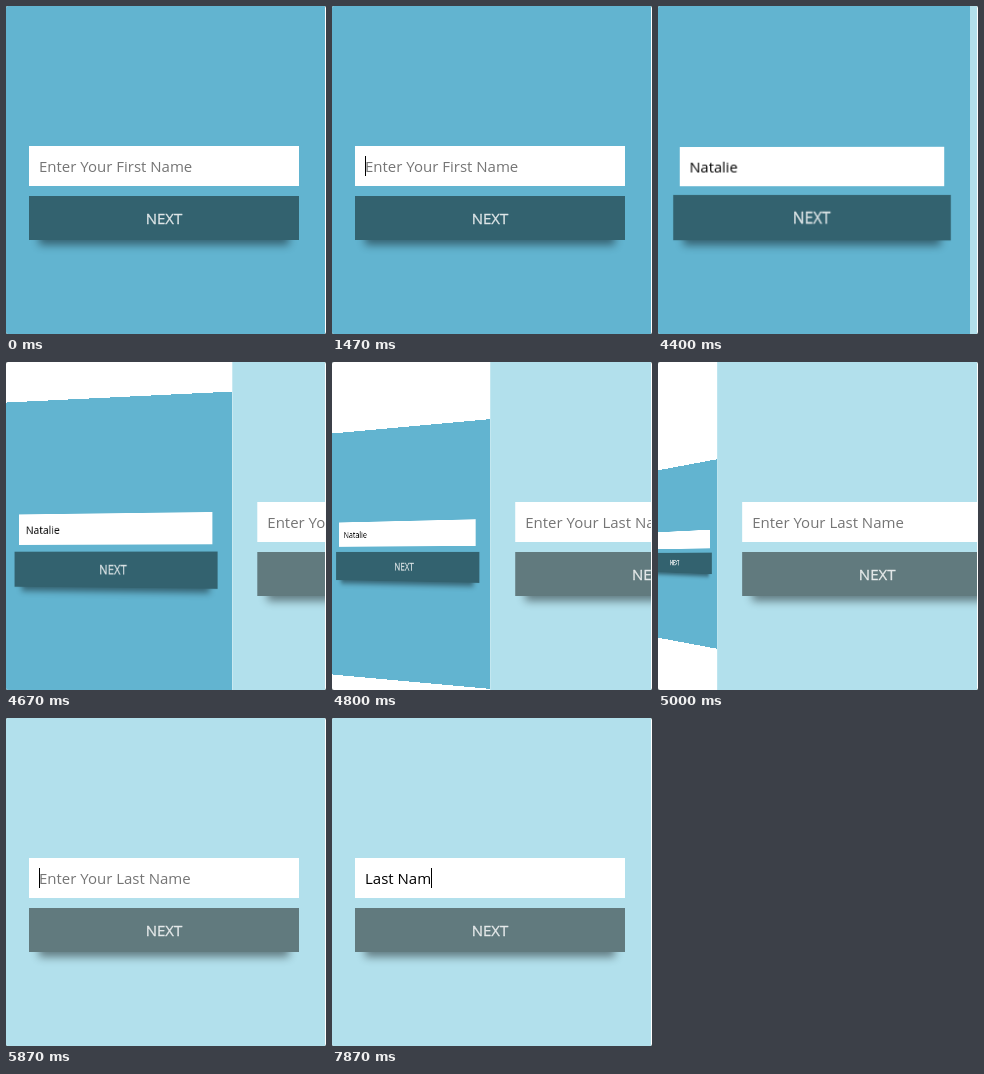
An HTML page that plays this animation: 320 by 328 pixels, repeating every 8000 ms.

```html
<!DOCTYPE html>
<html lang="en">
<head>
<meta charset="utf-8">
<title>Name form</title>
<style>
html, body { margin: 0; width: 100%; height: 100%; overflow: hidden; background: #566; }
#stage { position: absolute; width: 320px; height: 328px; overflow: hidden; background: #fff; border-radius: 2px; }
#view { position: absolute; width: 319px; height: 328px; overflow: hidden; }
.page {
  position: absolute; left: -2px; top: -8px; width: 321px; height: 400px;
  font: 15px/40px "Open Sans", sans-serif; transform-origin: 100% 50%;
}
.field {
  position: absolute; left: 25px; top: 148px; width: 260px; height: 40px; padding-left: 10px;
  display: flex; align-items: center; white-space: pre; background: #fff; color: #000;
}
.caret { width: 1px; height: 20px; margin-right: -1px; background: #000; }
.hint { color: #757575; }
.next {
  position: absolute; left: 25px; top: 198px; width: 270px; height: 44px; line-height: 45px;
  text-align: center; color: rgba(255, 255, 255, .8); -webkit-text-stroke: .3px;
  box-shadow: 0 15px 8px -10px rgba(0, 0, 0, .45);
}
#first { background: #62b4d0; }
#first .next { background: #33626f; }
#last { background: #b2e0ec; }
#last .next { background: #617a7e; }
</style>
</head>
<body>
<div id="stage"><div id="view">
  <div class="page" id="first">
    <div class="field"><span class="typed"></span><i class="caret"></i><span class="hint">Enter Your First Name</span></div>
    <div class="next">NEXT</div>
  </div>
  <div class="page" id="last">
    <div class="field"><span class="typed"></span><i class="caret"></i><span class="hint">Enter Your Last Name</span></div>
    <div class="next">NEXT</div>
  </div>
</div></div>
<script>
const LOOP = 8000, WIDTH = 321;
const clamp = x => Math.min(1, Math.max(0, x));

// cubic-bezier(.42, 0, .58, 1), solved by bisection
function easeInOut(x) {
  let lo = 0, hi = 1;
  for (let i = 0; i < 20; i++) {
    const s = (lo + hi) / 2, r = 1 - s;
    if (1.26 * s * r * r + 1.74 * s * s * r + s * s * s < x) lo = s; else hi = s;
  }
  return lo * lo * (3 - 2 * lo);
}

// keys: [time, letters typed]; carets: [on, off]
function makeForm(id, text, keys, carets) {
  const page = document.getElementById(id);
  const [typed, caret, hint, next] = ['.typed', '.caret', '.hint', '.next'].map(s => page.querySelector(s));
  return {
    page, next,
    update(t) {
      const key = keys.filter(k => k[0] <= t).pop();
      typed.textContent = key ? text.slice(0, key[1]) : '';
      hint.hidden = !!key;
      caret.style.visibility = carets.some(([on, off]) => t >= on && t < off) ? 'visible' : 'hidden';
    }
  };
}

const first = makeForm('first', 'Natalie',
  [[2270, 1], [2400, 2], [2530, 3], [2670, 5], [2730, 6], [3270, 7]],
  [[1470, 1930], [2270, 3730]]);
const last = makeForm('last', 'Last Name',
  [[6600, 1], [6800, 2], [6870, 3], [7000, 4], [7270, 5], [7600, 6], [7800, 7], [7870, 8]],
  [[5870, 6330], [6600, LOOP]]);

function draw() {
  const t = performance.now() % LOOP;
  first.update(t);
  last.update(t);

  const hover = easeInOut(clamp((t - 4000) / 270));
  first.next.style.transform = `scale(${1 + .05 * hover})`;

  // the old page shrinks and folds back while the new one slides in
  const p = easeInOut(clamp((t - 4293) / 1015));
  first.page.style.visibility = p > .999 ? 'hidden' : 'visible';
  first.page.style.transform = p < .0001 ? 'none' :
    `translateX(${-WIDTH * p}px) scale(${1 - .65 * p}) perspective(1400px) rotateY(${-65 * p}deg)`;
  last.page.style.transform = p > .999 ? 'none' : `translateX(${WIDTH * (1 - p)}px)`;
  requestAnimationFrame(draw);
}
draw();
</script>
</body>
</html>
```
